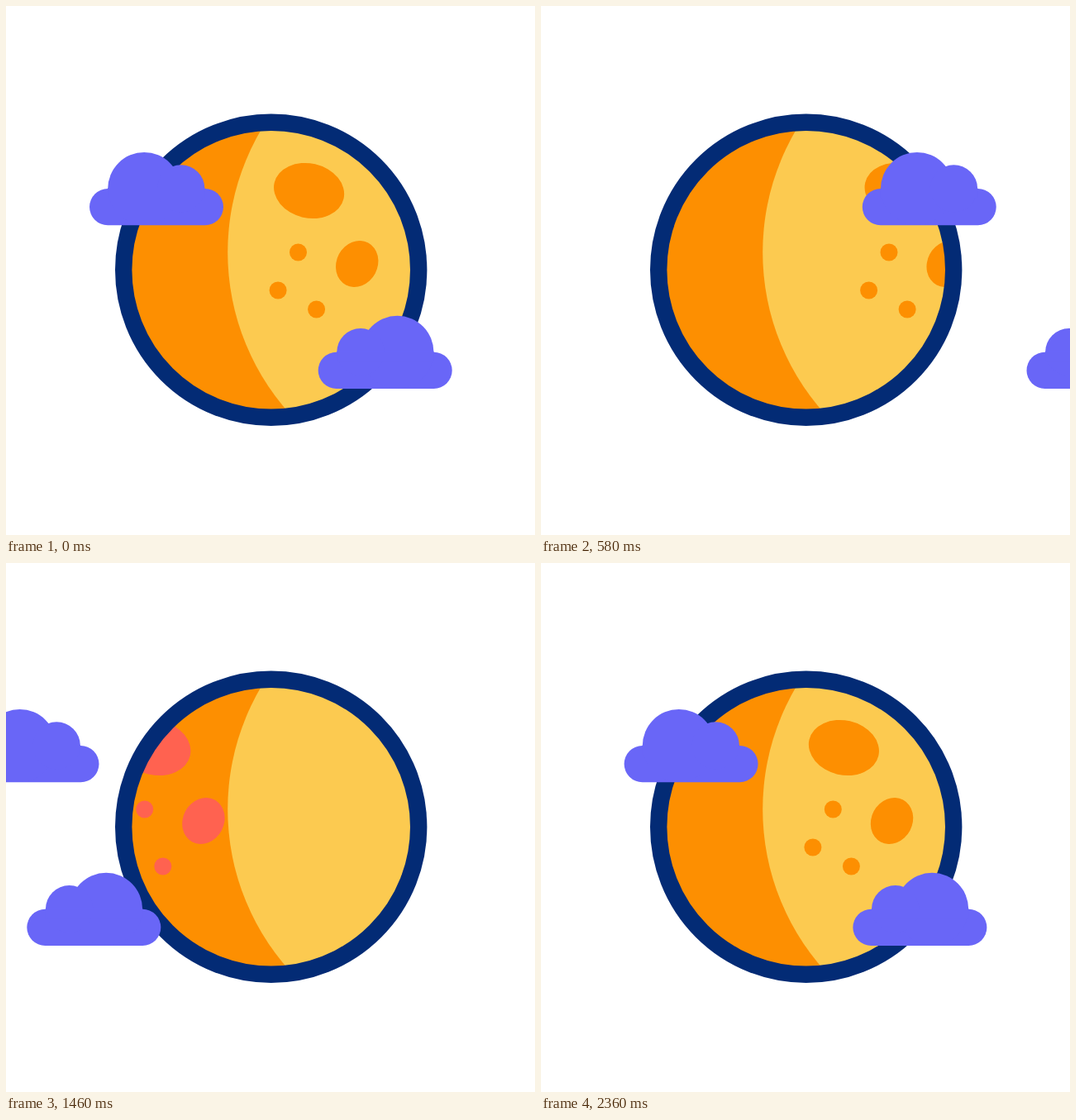
Write an HTML page that moves like this. It is 640 by 640 pixels and loops after 2.38 s.

```html
<!DOCTYPE html>
<html lang="en">
<head>
<meta charset="utf-8">
<title>Moon and clouds</title>
<style>
  html, body { margin: 0; width: 100%; height: 100%; overflow: hidden; background: #fff; }
  svg { display: block; width: 100vw; height: 100vh; }
</style>
</head>
<body>
<svg viewBox="0 0 640 640">
  <defs>
    <clipPath id="disc"><circle cx="320.7" cy="319.2" r="172"/></clipPath>
    <clipPath id="lit"><circle cx="559.8" cy="298" r="291.6"/></clipPath>
    <g id="craters">
      <ellipse rx="43" ry="33" transform="translate(366.5 223.5) rotate(13)"/>
      <ellipse rx="28.8" ry="24.8" transform="translate(424.6 312) rotate(-62)"/>
      <circle cx="353.4" cy="298" r="10.5"/>
      <circle cx="329" cy="344" r="10.5"/>
      <circle cx="375.5" cy="367" r="10.5"/>
    </g>
    <g id="cloud">
      <rect x="100.6" y="221" width="162" height="44.2" rx="22.1"/>
      <circle cx="166.8" cy="221" r="44"/>
      <circle cx="211.3" cy="221" r="28.7"/>
      <rect x="122.8" y="220" width="117.2" height="12"/>
    </g>
    <g id="cloud2"><use href="#cloud" transform="translate(640 197.8) scale(-1 1)"/></g>
  </defs>

  <g clip-path="url(#disc)">
    <rect width="640" height="640" fill="#fd8f01"/>
    <g fill="#ff6250">
      <use href="#craters" data-part="craters" data-way="out"/>
      <use href="#craters" data-part="craters" data-way="in"/>
    </g>
    <circle cx="559.8" cy="298" r="291.6" fill="#fcca50"/>
    <g clip-path="url(#lit)" fill="#fd8f01">
      <use href="#craters" data-part="craters" data-way="out"/>
      <use href="#craters" data-part="craters" data-way="in"/>
    </g>
  </g>
  <circle cx="320.7" cy="319.2" r="178.5" fill="none" stroke="#032b75" stroke-width="20.4"/>
  <g fill="#6966f7">
    <use href="#cloud" data-part="cloud" data-way="out"/>
    <use href="#cloud" data-part="cloud" data-way="in"/>
    <use href="#cloud2" data-part="cloud2" data-way="out"/>
    <use href="#cloud2" data-part="cloud2" data-way="in"/>
  </g>
</svg>
<script>
  const LOOP = 2380, LEAD = 20;

  // Cruise speed (px/ms) and ramp length (ms); "end" is when the part settles.
  const motion = {
    craters: { out: { v: 0.177, ramp: 438 }, in: { v: 0.3, ramp: 600, end: 2400 } },
    cloud: { out: { v: 0.691, ramp: 368 }, in: { v: 0.327, ramp: 320, end: 2100 } },
    cloud2: { out: { v: 0.5515, ramp: 440 }, in: { v: 0.54, ramp: 454, end: 2360 } }
  };

  // Distance covered when accelerating evenly, then cruising.
  function travel(u, { v, ramp }) {
    if (u <= 0) return 0;
    return u < ramp ? v * u * u / (2 * ramp) : v * (u - ramp / 2);
  }

  const parts = [...document.querySelectorAll('[data-part]')].map(el => ({
    el, m: motion[el.dataset.part][el.dataset.way]
  }));

  function draw(t) {
    for (const { el, m } of parts) {
      const entering = m.end !== undefined;
      const x = entering ? -travel(m.end - t, m) : travel(t, m);
      // Once the entering copy rests, it alone marks the place.
      el.setAttribute('transform', `translate(${x.toFixed(2)} 0)`);
    }
  }

  const start = performance.now();
  function tick() {
    draw((performance.now() - start) % LOOP + LEAD);
    requestAnimationFrame(tick);
  }
  draw(LEAD);
  requestAnimationFrame(tick);
</script>
</body>
</html>
```
